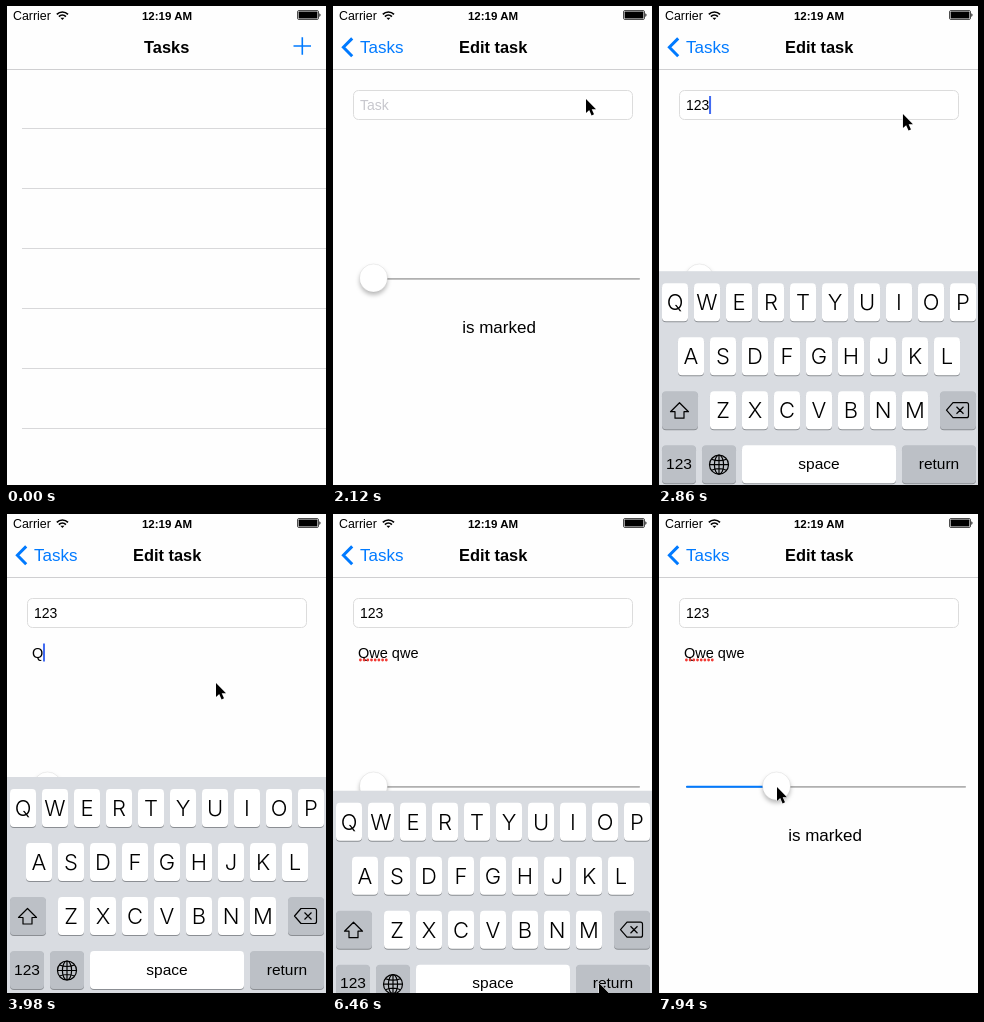
Write an HTML page that moves like this. It is 320 px wide and 480 px high and loops after 7.99 s.

```html
<!DOCTYPE html>
<html lang="en">
<head>
<meta charset="utf-8">
<title>Tasks</title>
<style>
html, body { margin: 0; width: 100%; height: 100%; overflow: hidden; background: #fefefe; }
svg { display: block; width: 320px; height: 480px; --bg: #fefefe; --blue: #007aff;
  font: 17px "Liberation Sans", Arial, sans-serif; }
text { white-space: pre; }
.bg { fill: var(--bg); }
.blue { fill: var(--blue); }
.bold { font-weight: bold; }
.mid { text-anchor: middle; }
.line { fill: none; stroke: #000; }
.small { font-size: 14px; }
.note { font-size: 14.5px; }
.key { font: 300 22px Inter, "Liberation Sans", sans-serif; text-anchor: middle; }
.word { font-size: 15.5px; text-anchor: middle; }
#thumb { filter: drop-shadow(0 3px 2px rgba(0,0,0,.26)); }
</style>
</head>
<body>
<svg viewBox="0 0 320 480">
  <defs>
    <linearGradient id="edge">
      <stop offset="0" stop-color="#000" stop-opacity="0"/>
      <stop offset="1" stop-color="#000" stop-opacity=".22"/>
    </linearGradient>
  </defs>
  <rect class="bg" width="320" height="480"/>
  <g id="list" fill="#d8d8da"></g>

  <g id="page">
    <rect x="-7" y="64" width="7" height="416" fill="url(#edge)"/>
    <rect class="bg" y="64" width="320" height="416"/>
    <rect x="21.5" y="84.5" width="279" height="29" rx="5" fill="#fff" stroke="#dcdcdc"/>
    <text id="hint" class="small" x="28" y="104" fill="#c7c7cd">Task</text>
    <text id="name" class="small" x="28" y="104"></text>
    <text id="note" class="note" x="26" y="144"></text>
    <path id="typo" d="M28.4 146H55" stroke="#f03a34" stroke-width="2.8" stroke-linecap="round" stroke-dasharray="0 3.7"/>
    <g id="bubble">
      <rect x="24" y="149" width="50" height="21" rx="3" fill="#fff" stroke="#c4c6ca"/>
      <text class="small blue" x="28" y="164">Awe</text>
      <path d="M63 157l6 6m0-6l-6 6" stroke="#8e8e93"/>
    </g>
    <rect id="caret" width="2" height="18" fill="#426bf2"/>
    <rect x="28" y="272" width="280" height="1.7" rx=".8" fill="#b0b0b0"/>
    <rect id="level" class="blue" x="28" y="271.8" height="2" rx="1"/>
    <circle id="thumb" cy="272" r="14" fill="#fff" stroke="#000" stroke-opacity=".12" stroke-width=".6"/>
    <text class="mid" x="167" y="327">is marked</text>
  </g>

  <rect class="bg" width="320" height="63"/>
  <rect y="63" width="320" height="1" fill="#cfcfd1"/>
  <text x="7" y="14" font-size="12.4">Carrier</text>
  <g class="line" stroke-width="1.7">
    <path d="M50.8 8.3a8 8 0 0 1 11.2 0"/>
    <path d="M52.9 10.6a5 5 0 0 1 7 0"/>
    <path d="M54.4 11.8h4l-2 2.1z" fill="#000" stroke="none"/>
  </g>
  <text class="bold mid" x="161" y="13.5" font-size="11.5">12:19 AM</text>
  <rect class="line" x="291.5" y="4.5" width="21" height="9" rx="1.5" stroke-width=".7"/>
  <rect x="292.6" y="5.6" width="18.8" height="6.8" rx=".6"/>
  <path d="M313.4 7.3q2.2 1.7 0 3.6z"/>

  <text id="title" class="bold mid" y="47" font-size="16.4">Tasks</text>
  <text id="edit" class="bold" y="47" font-size="16.4">Edit task</text>
  <path id="plus" d="M287.5 40h17.5M296.3 31.2v17.6" stroke="#007aff" stroke-width="1.6"/>
  <g id="back">
    <path class="line" d="M20.2 32.4L11.4 41.3L20.2 50.2" style="stroke:#007aff" stroke-width="3"/>
    <text id="backText" class="blue" y="47">Tasks</text>
  </g>

  <g id="keys"><rect y="263" width="320" height="217" fill="#d9dce1"/></g>
  <path id="pointer" d="M0 0V14L3.2 11.1L5.6 16.4L8 15.3L5.7 10.2H10Z" stroke="#fff" stroke-width="1" paint-order="stroke"/>
  <path d="M0 0H1V479H320V480H0Z"/>
</svg>
<script>
const LOOP = 7990;
const $ = id => document.getElementById(id);
const svg = document.querySelector("svg");
const set = (id, attrs) => { for (const k in attrs) $(id).setAttribute(k, attrs[k]); };
const show = (id, on) => set(id, { visibility: on ? "inherit" : "hidden" });
const clamp = v => Math.max(0, Math.min(1, v));
const add = (id, markup) => $(id).insertAdjacentHTML("beforeend", markup);

for (let y = 122; y < 480; y += 60) add("list", `<rect x="16" y="${y}" width="304" height="1"/>`);

function key(x, y, w, label = "", cls = "key", fill = "#fff") {
  const base = cls === "key" ? 27.3 : 23.5;
  add("keys", `<rect x="${x}" y="${y + 1}" width="${w}" height="38" rx="4" fill="#8b8e93"/>
    <rect x="${x}" y="${y}" width="${w}" height="38" rx="4" fill="${fill}"/>
    <text class="${cls}" x="${x + w / 2}" y="${y + base}">${label}</text>`);
}
["QWERTYUIOP", "ASDFGHJKL", "ZXCVBNM"].forEach((row, r) =>
  [...row].forEach((c, i) => key([4, 20, 52][r] + i * 32, 275 + r * 54, 26, c)));
const GREY = "#bcc0c6";
key(4, 383, 36, "", "word", GREY);
key(282, 383, 36, "", "word", GREY);
key(4, 437, 34, "123", "word", GREY);
key(44, 437, 34, "", "word", GREY);
key(84, 437, 154, "space", "word");
key(244, 437, 74, "return", "word", GREY);
add("keys", `<g class="line" stroke-width="1.2" stroke-linejoin="round">
  <path id="shift" d="M21.5 394.5L30.5 403.5H26V410H17V403.5H12.5Z"/>
  <path d="M288.5 402L295 394.5H308.5a2 2 0 0 1 2 2V407.5a2 2 0 0 1-2 2H295ZM298.5 398.5l7 7m0-7l-7 7"/>
  <circle cx="61" cy="456.5" r="9.5"/><ellipse cx="61" cy="456.5" rx="4.6" ry="9.5"/>
  <path d="M61 447v19M51.5 456.5h19M53.5 451q7.5 3 15 0M53.5 462q7.5-3 15 0"/></g>`);

// Bursts of screen updates: start, end, number of steps
const BURSTS = [[0, 0, 1], [660, 900, 5], [1440, 2120, 13], [2360, 3090, 14], [3330, 3330, 1],
  [3870, 4160, 5], [4400, 4400, 1], [4580, 4930, 6], [5530, 6170, 12], [6460, 7240, 14],
  [7300, 7530, 5], [7760, 7940, 4]];

function snap(t) {
  const [a, b, n] = BURSTS.filter(s => s[0] <= t).pop();
  if (n === 1 || t >= b) return b;
  const d = (b - a) / (n - 1);
  return a + Math.floor((t - a) / d + .15) * d;
}

// Critically damped ease, entered slightly after its beginning
function spring(t, start, lead) {
  if (t < start) return 0;
  const s = (t - start + lead) * .0123;
  const p = 1 - (1 + s) * Math.exp(-s);
  return p > .996 ? 1 : p;
}

// Pointer stops: time, x, y
const PATH = [[0, 326, 55], [600, 326, 55], [900, 289.5, 43], [1560, 289.5, 43], [2120, 254, 93],
  [2740, 254, 93], [2860, 245, 108], [3090, 210, 169], [5470, 210, 169], [6170, 267, 469],
  [6760, 267, 469], [7240, 84, 466], [7420, 14, 352], [7530, 42, 273], [7700, 42, 273], [7940, 119, 273]];

function pointerAt(t) {
  const i = PATH.findIndex(k => k[0] > t);
  if (i < 0) return PATH[PATH.length - 1].slice(1);
  const [a, x, y] = PATH[i - 1], [b, u, v] = PATH[i];
  let k = (t - a) / (b - a);
  k = k * k * (3 - 2 * k);
  return [x + (u - x) * k, y + (v - y) * k];
}

const typed = (text, times, t) => text.slice(0, times.filter(m => m <= t).length);
const NAME_TIMES = [2620, 2730, 2845];
const NOTE_TIMES = [3870, 4010, 4160, 4580, 4700, 4810, 4925];

function draw(now) {
  const t = snap(now);
  const p = spring(t, 1440, 81);
  svg.style.setProperty("--bg", p > 0 && p < 1 ? "#fafafa" : "#fefefe");
  set("list", { transform: `translate(${-96 * p})` });
  set("page", { transform: `translate(${320 * (1 - p)})` });
  show("page", p > 0);
  set("title", { x: 160.7 - 78 * p, opacity: clamp(1 - 1.9 * p) });
  set("plus", { opacity: clamp(1 - 1.8 * p) });
  set("edit", { x: 127 + 213 * (1 - p), opacity: clamp(1.75 * p) });
  set("back", { opacity: clamp((p - .21) * 1.4) });
  set("backText", { x: 28 + 78 * (1 - p) });

  const up = spring(t, 2360, 33) - spring(t, 6460, 33);
  set("keys", { transform: `translate(0 ${217 * (1 - up)})` });
  show("keys", up > 0);

  const name = typed("123", NAME_TIMES, t);
  const note = typed("Qwe qwe", NOTE_TIMES, t);
  $("name").textContent = name;
  $("note").textContent = note;
  show("hint", !name);
  show("typo", t >= 4580);
  show("bubble", t >= 4400 && t < 4580);
  set("shift", { fill: (t < 3330 ? name : note) ? "none" : "#000" });

  const inNote = t >= 3330;
  const [field, x, y] = inNote ? ["note", 26, 129.5] : ["name", 28, 90];
  set("caret", { x: x + $(field).getComputedTextLength() - .3, y });
  show("caret", p === 1 && t >= 2360 && t < 6460 && !(t >= 5530 && t < 5950));

  const thumb = 41.5 + 77 * clamp((t - 7700) / 240);
  set("thumb", { cx: thumb });
  set("level", { width: thumb > 42 ? thumb - 28 : 0 });

  const [px, py] = pointerAt(t);
  set("pointer", { transform: `translate(${px} ${py})` });
}

const begin = performance.now();
function tick() {
  draw((performance.now() - begin) % LOOP);
  requestAnimationFrame(tick);
}
tick();
</script>
</body>
</html>
```
